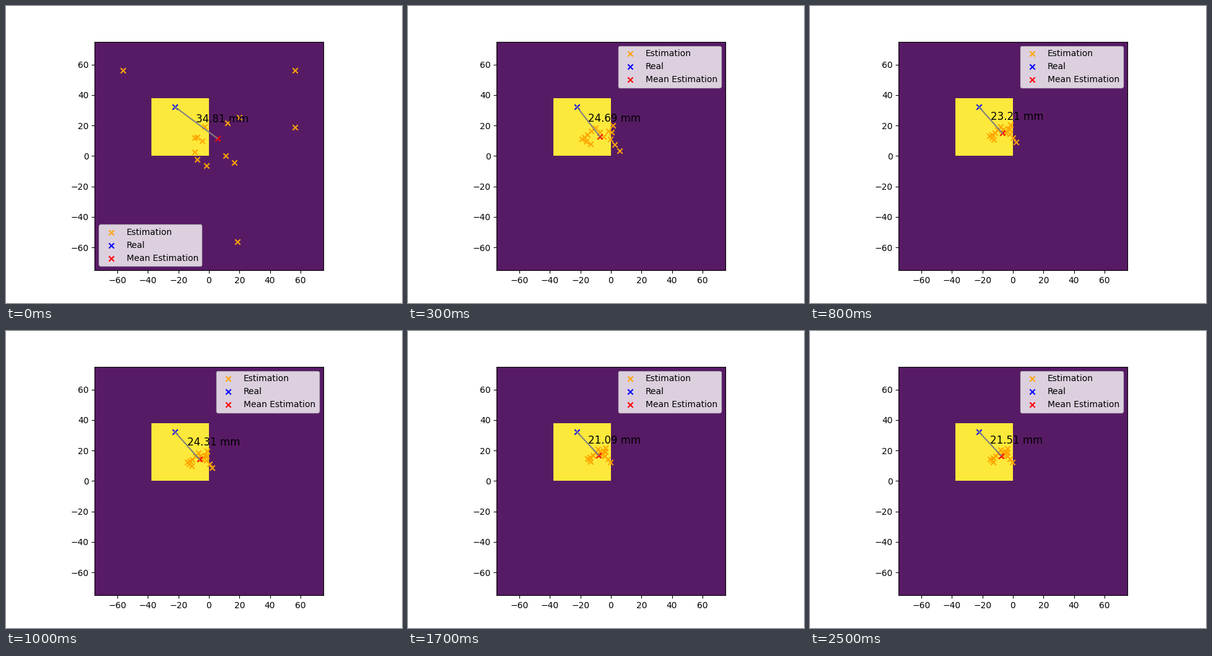
A matplotlib script for the animation above (2.6 s loop, 640x480 px).

```python
import matplotlib.pyplot as plt
import numpy as np
from matplotlib.animation import FuncAnimation

FRAMES = 26
INTERVAL = 100
HALF = 75
CELL = 0.75 * HALF
REAL = np.array([-22.4, 32.3])

# Step -> position of the mean estimate
MEAN_PATH = {0: (5.53, 11.53), 1: (-5.26, 6.27), 5: (-8.44, 16.61),
             10: (-6.21, 14.17), 14: (-8.25, 17.12), 20: (-7.79, 16.69),
             25: (-7.72, 16.58)}


def along(*corners):
    """The corners of a path and the midpoints of its sides."""
    corners = np.array(corners)
    spots = np.linspace(0, len(corners) - 1, 2 * len(corners) - 1)
    return np.column_stack([np.interp(spots, range(len(corners)), axis)
                            for axis in corners.T])


# The first guesses: four cell centres and a loose ring
scattered = np.array([
    (-CELL, CELL), (CELL, CELL), (CELL, CELL / 3), (CELL / 3, -CELL),
    (20, 25.4), (12.2, 21.6), (-2.9, 19.3), (-9.3, 12), (-7.9, 12.2),
    (-4.5, 9.8), (-9.3, 2.4), (-7.7, -2.4), (-1.6, -6.4), (11, 0),
    (16.6, -4.4)])
wide = along((-15, 1.6), (-29, 7.3), (-25.4, 12.5), (-15, 18.5),
             (-1.8, 7), (12.8, 21.5), (7.1, 3.6), (19.3, -12.2))
settled = along((-12.5, 13), (-14, 15), (-10.5, 16.5), (-7.5, 20.7),
                (-6, 17.5), (-4.2, 21.5), (-4, 17), (-1, 13.4))


def mean_at(step):
    """Follow the path on a log scale, as a running average slows down."""
    keys = np.log1p(list(MEAN_PATH))
    return np.array([np.interp(np.log1p(step), keys, axis)
                     for axis in zip(*MEAN_PATH.values())])


def points_at(step):
    if step == 0:
        return scattered
    points = settled + (wide - settled) / step
    return points - points.mean(axis=0) + mean_at(step)


fig, ax = plt.subplots(figsize=(6.4, 4.8), dpi=100)
room = np.zeros((4, 4))
room[1, 1] = 1
ax.imshow(room, extent=(-HALF, HALF, -HALF, HALF), alpha=0.9)


def crosses(color, label):
    return ax.scatter([0], [0], marker="x", color=color, label=label)


estimates = crosses("orange", "Estimation")
real = crosses("blue", "Real")
mean_mark = crosses("red", "Mean Estimation")
real.set_offsets([REAL])
link, = ax.plot([], [], color="gray")
label = ax.text(0, 0, "", fontsize=12)
ax.set(xlim=(-HALF, HALF), ylim=(-HALF, HALF))
legend = ax.legend(loc="upper right")


def update(step):
    mean = mean_at(step)
    estimates.set_offsets(points_at(step))
    mean_mark.set_offsets([mean])
    link.set_data(*zip(REAL, mean))
    label.set_position((REAL + mean) / 2)
    label.set_text(f"{np.hypot(*(mean - REAL)):.2f} mm")
    legend.set_loc("lower left" if step == 0 else "upper right")
    return estimates, mean_mark, link, label, legend


anim = FuncAnimation(fig, update, frames=FRAMES, interval=INTERVAL,
                     repeat=True, repeat_delay=0)
plt.show()
```
